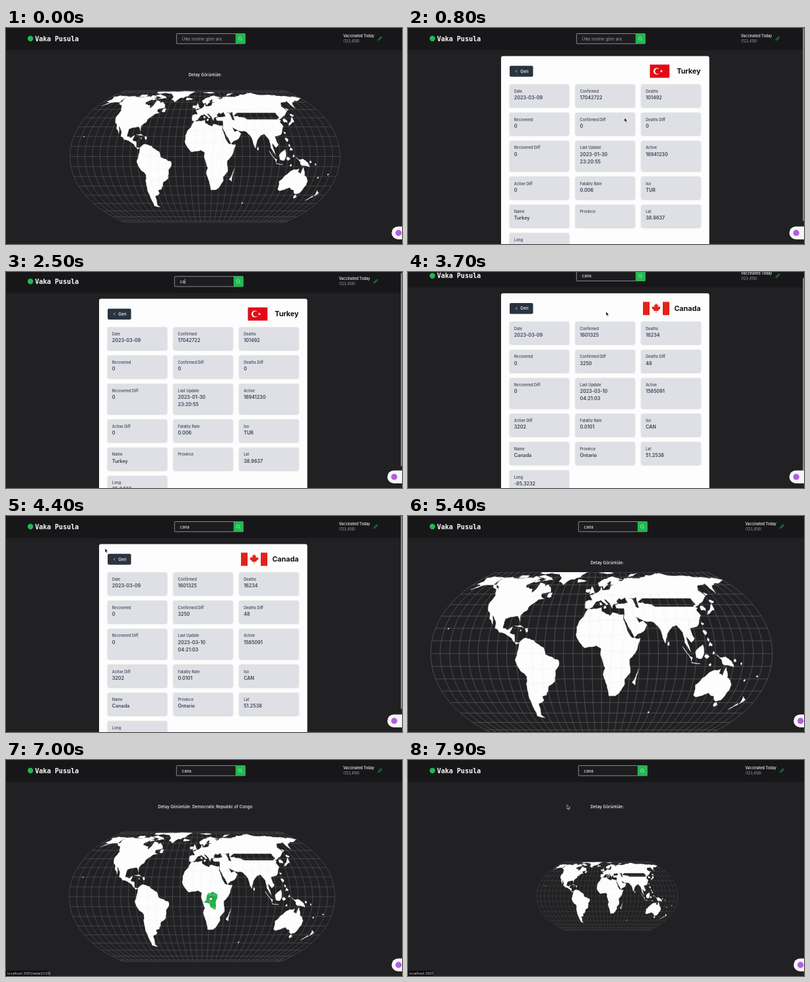
An HTML page for the animation above (8 s loop, 600 px wide and 327 px high).

```html
<!DOCTYPE html>
<html lang="tr">
<head>
<meta charset="utf-8">
<style>
html, body { margin: 0; width: 100%; height: 100%; overflow: hidden; background: #212123; }
svg { display: block; width: 100vw; height: 100vh; font-family: Inter, "Open Sans", sans-serif; }
text { white-space: pre; }
.logo { font: bold 10px "DejaVu Sans Mono", monospace; }
.label { font-size: 5.6px; font-weight: 500; fill: #374151; }
.value { font-size: 7.15px; font-weight: 600; fill: #374151; }
.cell { fill: #dfe0e5; filter: drop-shadow(0 1px 1px #0003); }
</style>
</head>
<body>
<svg viewBox="0 0 600 327">
  <clipPath id="clip"><rect y="85" width="600" height="242"/></clipPath>
  <clipPath id="coast"><use href="#land"/></clipPath>
  <g id="home">
    <text id="title" x="301.8" y="72.6" text-anchor="middle" font-size="6.25" font-weight="500" fill="#f4f4f5"></text>
    <g clip-path="url(#clip)"><g id="map" stroke-linejoin="round">
      <path id="grid" fill="none" stroke="#68686b" stroke-width=".0064"/>
      <path id="land" fill="#fdfdfd" stroke="#fdfdfd" stroke-width=".004"/>
      <path id="hover" fill="#22b34c"/>
      <path id="borders" clip-path="url(#coast)" fill="none" stroke="#e8e8ea" stroke-width=".005"/>
    </g></g>
  </g>
  <g id="page">
    <g id="head">
      <rect width="600" height="32" fill="#171719" style="filter:drop-shadow(0 1px 1px #0005)"/>
      <circle cx="37" cy="16" r="4.2" fill="#22b850"/>
      <text class="logo" x="44" y="19.7" fill="#fff">Vaka Pusula</text>
      <g id="search">
        <rect x="258.3" y="8.5" width="104" height="15.3" rx="1" fill="#1d1d1f" stroke="#d4d4d8" stroke-width=".6"/>
        <rect x="347.8" y="8.3" width="14.7" height="15.7" rx="1" fill="#22b850"/>
        <path d="M352.3 15.8a2.4 2.4 0 1 0 4.8 0a2.4 2.4 0 1 0-4.8 0M356.5 17.6l1.6 1.6" fill="none" stroke="#d5f5df" stroke-width=".6"/>
        <text id="query" x="266.5" y="18.5" font-size="6.25"></text>
        <path id="caret" d="M0 12.3v7.5" stroke="#fff" stroke-width=".6"/>
      </g>
      <g id="vaccine">
        <text x="511" y="14" font-size="5.5" font-weight="500" fill="#f4f4f5">Vaccinated Today</text>
        <text x="511" y="22.2" font-size="5.5" fill="#a1a1aa">(123,456)</text>
        <path transform="translate(562.6 12.2) scale(.32)" fill="none" stroke="#22b850" stroke-width="2.4" d="m18 2 4 4M17 7l3-3M19 9 8 20l-4-4L15 5M9 11l4 4M5 19l-3 3M14 4l6 6"/>
      </g>
    </g>
    <g id="detail"></g>
  </g>
  <rect id="thumb" x="598.2" width="1.8" height="292" fill="#8f8f92"/>
  <g id="badge">
    <rect x="584.3" y="300.5" width="40" height="19.4" rx="9.7" fill="#f7f4f8"/>
    <circle cx="594.7" cy="310.2" r="4.6" fill="#b05fdc"/>
  </g>
  <g id="status">
    <rect id="statusBox" x="-3" y="319" height="12" rx="2" fill="#0c0c0d"/>
    <text id="url" x="2" y="325" font-size="5.3" fill="#d4d4d8"></text>
  </g>
  <path id="cursor" stroke-linejoin="round" stroke-width=".6"/>
</svg>
<script>
const $ = id => document.getElementById(id);
const set = (id, attrs) => { for (const k in attrs) $(id).setAttribute(k, attrs[k]); };
const show = (id, on) => set(id, { display: on ? 'inline' : 'none' });
const range = (a, b, step) => Array.from({ length: Math.round((b - a) / step) + 1 }, (_, i) => a + i * step);
const hash = (x, y) => { const v = Math.sin(x * 12.9898 + y * 78.233) * 43758.5; return v - Math.floor(v) - .5; };

// Equal Earth projection, rotated ten degrees
function project([lon, lat]) {
  const a = 1.340264, b = -.081106, c = .000893, d = .003796, rad = Math.PI / 180;
  const q = Math.asin(Math.sqrt(3) / 2 * Math.sin(lat * rad)), s = q * q, s3 = s ** 3;
  const x = 2 * Math.sqrt(3) * (lon - 10) * rad * Math.cos(q) /
    (3 * (a + 3 * b * s + s3 * (7 * c + 9 * d * s)));
  return [x, -q * (a + b * s + s3 * (c + d * s))].map(v => v.toFixed(4));
}
const line = pts => 'M' + pts.map(project).join('L');

// Splits an edge into a ragged coast; the same in both directions, so borders meet
function rough(p, q) {
  const len = Math.hypot(q[0] - p[0], q[1] - p[1]);
  if (len < 2.5 || p[1] == q[1]) return [q];
  const x = (p[0] + q[0]) / 2, y = (p[1] + q[1]) / 2, amp = Math.min(len * .2, 2.2);
  const m = [x + hash(x, y) * amp, y + hash(y, x) * amp];
  return [...rough(p, m), ...rough(m, q)];
}
const pairs = flat => range(0, flat.length / 2 - 1, 1).map(i => flat.slice(2 * i, 2 * i + 2));
function shape(flat) {
  const pts = pairs(flat);
  return line(pts.flatMap((p, i) => rough(p, pts[(i + 1) % pts.length]))) + 'Z';
}
const all = list => list.map(shape).join('');
const island = ([lon, lat, r]) => line(range(0, 8, 1).map(i => {
  const a = i * Math.PI / 4, k = r * (1 + hash(lon + i, lat));
  return [lon + k * Math.cos(a) / Math.cos(lat * Math.PI / 180), lat + k * Math.sin(a)];
})) + 'Z';

const usa = [
  [-141,69.6,-156,71,-166,68.3,-161,64,-165,61,-157,58.6,-164,54.6,-151,60,-141,60,-130,55,-137,60],
  [-124,49,-95,49,-84,46.5,-82.5,42,-75,45,-69,47,-67,45,-70.5,42,-75.5,38,-75.6,35.3,-81.3,31,-80.3,25.5,-84,30,-90,29.5,-97,28,-97.3,26,-101.5,29.8,-106.5,31.8,-117,32.5,-120.6,34.6,-124.3,40.4]
];
const congo = [[12.5,-6,20,-7,22,-11,28.5,-13,29,-4,31,2,25,5,18,3.5,16,-3]];
const turkey = [[26.2,40.5,35,42,44,40,44,37.2,36,36.5,27.3,37]];
const canada = [[-141,60,-141,69.6,-128,70.3,-115,68,-95,68.5,-94,71.8,-82,69,-87,64.5,-94.7,60,-92.5,57,-82.3,55.2,-79.5,51.3,-77,56,-77.5,62.4,-70,61,-67.5,58.3,-64.5,60.3,-56,52.5,-66.5,50.2,-64.8,47,-61,45.5,-67,45,-69,47,-75,45,-82.5,42,-84,46.5,-95,49,-124,49,-130,55,-137,60]];
const arctic = [
  [-62,66,-77,64.5,-73,68,-89,71,-80,73.7,-67,69.5], [-117,69,-105,69,-105,73,-117,73], [-78,76.2,-91,77,-92,81,-63,82.7],
  [-73,78.3,-60,82,-30,83.6,-12,81.4,-20,75,-23,70,-38,65.7,-43.5,60,-52,64,-51,69,-58,75], [52,71,58,72,68,76.5,55,74]
];
const latin = [
  [-117,32.5,-106.5,31.8,-101.5,29.8,-97.3,26,-97,20,-91,18.6,-87,21.5,-88.5,16,-83.3,15,-82,9,-77.3,8.6,-80.4,7.3,-87.6,13,-95,16,-105.5,20,-106,24,-113,31,-109.5,23.2,-115,28],
  [-77.3,8.6,-71.5,12.3,-62,10.5,-51,4.5,-49,-1,-35.3,-5.3,-35,-8.5,-39,-13,-41,-22,-48.6,-26,-53,-33.5,-58,-34.5,-57.5,-38,-65,-41,-66,-47,-68.5,-52,-65.2,-54.7,-74,-53,-73.5,-38,-70.4,-18.4,-76.2,-14,-81.2,-5,-77.5,4],
  [-85,22,-74.5,20.3,-78,22.3]
];
const africa = [
  [-6,35.8,10,37.3,10.3,34,19.5,30.4,22,32.8,32.5,31.2,37.2,20,43.2,12.2,51.2,11.9,48,4.5,39.5,-4.5,40.7,-15,35,-20,35.5,-24,32,-29,26,-34,18.3,-34,14.5,-22.7,11.8,-17,13.8,-11,9,-1,9.5,4,4.4,6.3,-7.6,4.4,-13,8.5,-17.3,14.8,-17,21,-10,29.5],
  [49.5,-12,47,-25,43.5,-23]
];
const europe = [
  [-9,43,-9,37,-5.5,36,-1,37.5,3.2,42.5,9,44.3,15.8,39.5,18,40.5,13,45,19.4,41.8,22.5,36.7,24,40.5,29,41,28,43.5,32,46.3,34,44.5,39,47,40,60,30,60,23,59,20,54.5,11,54,10,57.5,8.5,54,2,51,-4.7,48.5,-1.5,44],
  [40,64.5,34,66.7,41,66.5,28,71,13,67,5,62,7,58,11.3,58.8,13,55.5,18.8,60,18,62,24,65.8,22,60.5,30,60,40,60],
  [-5.5,50.1,1.4,51.5,-3,58.6,-4.5,53]
];
const asia = [
  [39,47,53,46.8,53,42,75,38,120,38,130,42,140.5,48,137,54,143,59.3,156,61.5,157,51,163,59.5,179,62.5,190,66,180,69,140,72.5,113,74,105,77.6,81,73.5,68,68.5,44,68,40,64.5,40,60],
  [26.5,40,41.5,41.5,39,47,48,45,50,38,54,37,53,42,60,46,120,46,122,40,118,38.5,122,37,119.3,35,122,30.5,116,22.8,106,20,109,12,105,8.7,100.6,13.4,104,1.4,98.3,8.3,97.3,16.8,91.8,22.5,87,21.3,80,14,77.5,8.1,72.8,20,66.5,25.3,57,26,48.5,30,51.5,24.5,56.2,26,59.8,22.5,55,17.3,45,12.7,39,21.5,35,29,36,36.8,27.3,37],
  [32.5,31.2,35,31.5,34.2,27.8], [130,31.5,140.5,35.5,141.5,41,137,37]
];
const oceania = [
  [95.3,5.6,106,-3,105,-6], [105,-6.5,114.5,-8,106,-7.6], [109,1.5,117,7,118,1,115.5,-4,110,-3],
  [131,-.8,135,-3,141,-2.6,147.5,-6,150.5,-10.4,143,-9,138,-8,137,-5],
  [142.5,-10.7,146,-19,153,-25,153.3,-29,150,-37.5,144,-38.7,138,-34,131,-31.5,118,-35,115.3,-33.5,113.4,-25,122,-18,130,-13,136.8,-12,136,-15.5,140.5,-17.5],
  [173,-34.5,178.4,-37.7,175,-41.5], [172.7,-40.6,174,-42,167,-46.5]
];
// Longitude, latitude, radius
const islands = [
  [-19,65,2.2], [-8,53.3,1.7], [14,37.5,1], [9,40.7,1.1], [-71,18.9,1.6], [-77.3,18.1,.7], [-56,49,2], [-84,64.5,1.5], [18,78.5,2],
  [142.7,50,1.2], [143,43.3,1.5], [127.6,36.8,2.2], [121,23.7,1], [80.7,7.5,1.2], [121,16.3,1.8], [125,7.5,1.6], [123.5,11,1.1],
  [121,-2.3,2], [125,-9,1], [128,.5,1], [151,-5.5,1], [158,-8,.8], [165.5,-21.3,.8], [178,-17.8,.7], [-156,19.8,.6], [146.7,-42,1.5], [69.5,-49.2,.6]
];

const meridian = (lon, top) => line(range(-top, top, 5).map(lat => [lon, lat]));
const parallel = lat => line([[-170, lat], [190, lat]]);
set('grid', { d: [
  meridian(-170, 90), meridian(190, 90), parallel(-90), parallel(90),
  ...range(-160, 180, 10).map(lon => meridian(lon, lon % 90 ? 80 : 90)), ...range(-80, 80, 10).map(parallel)
].join('') });
set('land', { d: all([usa, canada, arctic, latin, africa, europe, asia, oceania].flat()) + islands.map(island).join('') });
const border = (p, q) => line([p, ...rough(p, q)]);
set('borders', { d: [
  ...range(-65, 115, 12).map(lon => border([lon, -30], [lon + 4, 50])),
  ...range(-24, 48, 12).map(lat => border([-80, lat], [120, lat + 3]))
].join('') });

// Country page
const labels = ['Date', 'Confirmed', 'Deaths', 'Recovered', 'Confirmed Diff', 'Deaths Diff', 'Recovered Diff', 'Last Update',
  'Active', 'Active Diff', 'Fatality Rate', 'Iso', 'Name', 'Province', 'Lat', 'Long'];
const values = {
  Turkey: '2023-03-09|17042722|101492|0|0|0|0|2023-01-30 23:20:55|16941230|0|0.006|TUR|Turkey||38.9637|35.2433',
  Canada: '2023-03-09|1601325|16234|0|3250|48|0|2023-03-10 04:21:03|1585091|3202|0.0101|CAN|Canada|Ontario|51.2538|-85.3232'
};
const half = pairs([0,-8,1.4,-5.3,3,-6.1,2.3,-1.9,4,-3.6,4.5,-2.6,6.4,-3,5.8,-1,6.7,-.4,3.2,2.5,3.7,3.9,.4,3.5,.4,7]);
const leaf = [...half, ...half.map(([x, y]) => [-x, y]).reverse()].join(' ');
const star = range(0, 9, 1).map(i => {
  const a = i * Math.PI / 5 + Math.PI, r = i % 2 ? .95 : 2.4;
  return [384 + r * Math.cos(a), 65.4 + r * Math.sin(a)];
}).join(' ');
const flags = {
  Turkey: `<path fill="#e30a17" d="M366.5 55.4h29.7v20h-29.7z"/><circle cx="377" cy="65.4" r="5" fill="#fff"/>
    <circle cx="378.3" cy="65.4" r="4" fill="#e30a17"/><polygon points="${star}" fill="#fff"/>`,
  Canada: `<path fill="#fff" d="M356 55.4h40v20h-40z"/><path fill="#e2231a" d="M356 55.4h10v20h-10zM386 55.4h10v20h-10z"/>
    <polygon points="${leaf}" transform="translate(376 65.6)" fill="#e2231a"/>`
};
function countryPage(name) {
  const data = values[name].split('|');
  const cells = labels.map((label, i) => {
    const row = i / 3 | 0, x = 154 + i % 3 * 99.7, y = 85.3 + row * 42.7 + (row > 2 ? 11.4 : 0);
    return `<rect class="cell" x="${x}" y="${y}" width="90" height="${row == 2 ? 45.5 : 34}" rx="2.2"/>
      <text class="label" x="${x + 6.8}" y="${y + 12.7}">${label}</text>` +
      data[i].split(' ').map((s, n) => `<text class="value" x="${x + 6.8}" y="${y + 22.9 + 11 * n}">${s}</text>`).join('');
  });
  return `<rect x="141" y="42.4" width="315.5" height="313.6" rx="3" fill="#fdfdfd"/>
    <rect x="154" y="57.2" width="35.5" height="16.6" rx="2" fill="#29343f"/>
    <path d="m165.2 63.5-1.9 1.9 1.9 1.9" fill="none" stroke="#fff" stroke-width=".7"/>
    <text x="170.3" y="67.7" font-size="6.2" font-weight="500" fill="#fff">Geri</text>${flags[name]}
    <text x="443.4" y="69.3" text-anchor="end" font-size="10.7" font-weight="700" fill="#111">${name}</text>` + cells.join('');
}

// Timeline: rows of [time, ...values], eased between rows
function tween(t, keys) {
  const i = keys.findIndex(k => k[0] > t);
  if (i < 1) return keys.at(i).slice(1);
  const [p, q] = [keys[i - 1], keys[i]], u = (t - p[0]) / (q[0] - p[0]), e = u * u * (3 - 2 * u);
  return p.slice(1).map((v, n) => v + (q[n + 1] - v) * e);
}
const latest = (t, keys) => keys.filter(k => k[0] <= t).at(-1)[1];
const hold = (from, to, ...v) => [[from, ...v], [to, ...v]];

const view = [...hold(0, 5100, 301.5, 194.5, 75.6), ...hold(5700, 6300, 285, 222, 115.5), ...hold(6850, 7200, 297, 207, 74.4), [7700, 302, 206, 39.5]];
const scrolls = [[1050, 0], ...hold(1350, 1550, 38.8), [1850, 4], ...hold(2100, 3000, 1.8), ...hold(3200, 3600, 0), ...hold(3900, 4000, 38.8), [4250, 0]];
const pointer = [[100, 300, 180], ...hold(400, 800, 328, 136), ...hold(1300, 1550, 199, 158), [1900, 300, 14], [3700, 300, 60],
  ...hold(4300, 4400, 150, 49), ...hold(4600, 4850, 174, 64), ...hold(5900, 6250, 100, 138), ...hold(6800, 7200, 309, 205), [7700, 241, 68]];
const pages = [[0, ''], [800, 'Turkey'], [3300, 'Canada'], [4800, '']];
const typed = [[0, ''], [2300, 'c'], [2450, 'ca'], [2700, 'can'], [2900, 'cana']];
const places = {
  Turkey: ['TUR', turkey], 'United States': ['USA', usa], 'Democratic Republic of Congo': ['COD', congo]
};
const hovers = [[0, ''], [350, 'Turkey'], [800, ''], [5850, 'United States'], [6350, ''], [6750, 'Democratic Republic of Congo'], [7300, '']];
const arrow = 'M0 0v6.2l1.5-1.3 1 2.3 1.1-.5-1-2.2h1.9z';
const hand = 'M-.6.7q.6-1 1.2 0v2.5l2.7.5q.8.2.7 1L3.3 7.5h-3.4L-2.4 4.7q.4-.8 1.8.3z';
let shown = '';

function draw() {
  const t = performance.now() % 8000, page = latest(t, pages), place = latest(t, hovers), text = latest(t, typed);
  show('home', !page); show('detail', page); show('thumb', page);
  if (page && page != shown) $('detail').innerHTML = countryPage(shown = page);

  const [scroll] = tween(t, scrolls), [cx, cy, r] = tween(t, view);
  set('page', { transform: `translate(0 ${page ? -scroll : 0})` });
  set('thumb', { y: scroll * .893 });
  set('map', { transform: `translate(${cx} ${cy}) scale(${r})` });
  set('hover', { d: place ? all(places[place][1]) : '' });
  $('title').textContent = 'Detay Görüntüle:' + (place && ' ' + place);

  set('search', { transform: `translate(${page ? -3 : 0})` });
  for (const id of ['vaccine', 'badge']) set(id, { transform: `translate(${page ? -6.5 : 0})` });
  $('query').textContent = text || 'Ülke ismine göre ara';
  set('query', { fill: text ? '#fff' : '#a1a1aa' });
  show('caret', t > 2100 && t < 3300);
  set('caret', { transform: `translate(${267 + (text ? $('query').getComputedTextLength() : 0)})` });

  const url = place ? 'localhost:3001/detail/' + places[place][0] : t >= 7300 ? 'localhost:3001' : '';
  show('status', url);
  $('url').textContent = url;
  set('statusBox', { width: url.length * 2.4 + 7.5 });

  const [x, y] = tween(t, pointer), pointing = place || (t > 4550 && t < 4800);
  show('cursor', t >= 100 && (t < 2200 || t > 3700));
  set('cursor', {
    d: pointing ? hand : arrow, transform: `translate(${x} ${y})`,
    fill: pointing ? '#fff' : '#000', stroke: pointing ? '#111' : '#fff'
  });
  requestAnimationFrame(draw);
}
draw();
</script>
</body>
</html>
```
